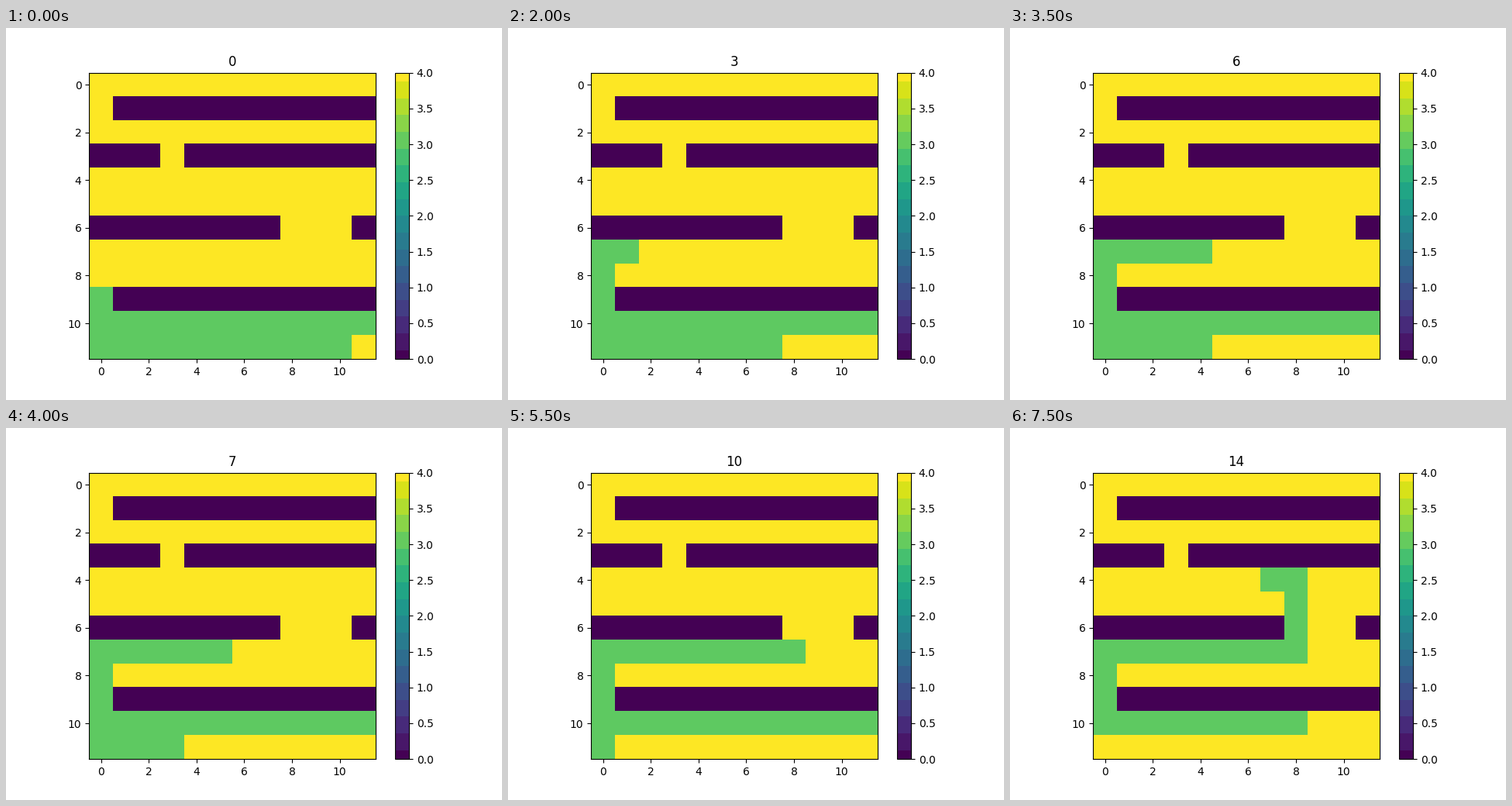
Animation, 640 px wide and 480 px high, one loop 8000 ms. Source, as a matplotlib script:

```python
import matplotlib.pyplot as plt
import numpy as np
from matplotlib.animation import FuncAnimation
from matplotlib.cm import ScalarMappable
from matplotlib.colors import ListedColormap, Normalize

SIZE = 12
WALL, SNAKE, FLOOR = 0, 3, 4
FRAMES, INTERVAL = 16, 500
BANDS = 17


def build_maze():
    maze = np.full((SIZE, SIZE), FLOOR)
    maze[1, 1:] = WALL
    maze[3, :] = WALL
    maze[3, 3] = FLOOR
    maze[6, :] = WALL
    maze[6, 8:11] = FLOOR
    maze[9, 1:] = WALL
    return maze


def build_path():
    """Cells (row, column) in the order the snake visits them."""
    path = [(11, c) for c in range(10, -1, -1)]
    path += [(10, c) for c in range(11, -1, -1)]
    path += [(r, 0) for r in (9, 8)]
    path += [(7, c) for c in range(9)]
    path += [(r, 8) for r in (6, 5, 4)]
    path += [(4, 7)]
    return path


MAZE = build_maze()
PATH = build_path()
LENGTH = 24


def board(step):
    grid = MAZE.copy()
    for cell in PATH[step:step + LENGTH]:
        grid[cell] = SNAKE
    return grid


fig, ax = plt.subplots(figsize=(6.4, 4.8), dpi=100)
norm = Normalize(WALL, FLOOR)
image = ax.imshow(board(0), cmap="viridis", norm=norm)
title = ax.set_title("0")

# The scale is shown in coarse colour steps.
levels = np.round(np.linspace(0, 1, 256) * BANDS) / BANDS
stepped = ListedColormap(plt.get_cmap("viridis")(levels))
fig.colorbar(ScalarMappable(norm, stepped), ax=ax)


def update(frame):
    step = max(0, frame - 1)  # the opening pose is held for two beats
    image.set_data(board(step))
    title.set_text(str(step))
    return image, title


anim = FuncAnimation(fig, update, frames=FRAMES, interval=INTERVAL,
                     repeat=True, repeat_delay=0)
plt.show()
```
